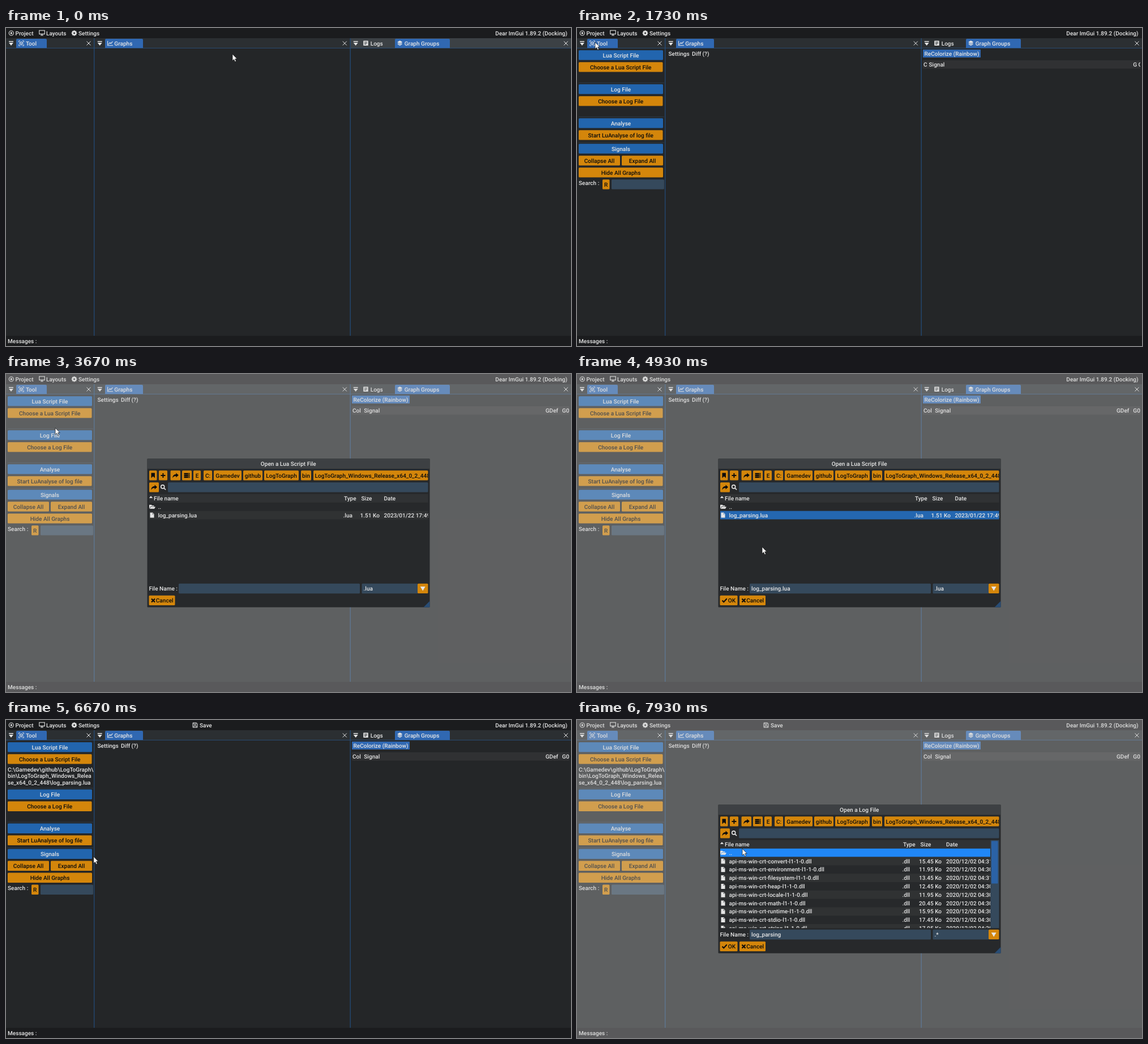
An HTML page that plays this animation: 998x561 px, repeating every 8000 ms.

```html
<!DOCTYPE html>
<html lang="en">
<head>
<meta charset="utf-8">
<title>Log to graph</title>
<style>
html, body { margin: 0; width: 100%; height: 100%; overflow: hidden; background: #242628; }
svg { display: block; width: 998px; height: 561px; }
text { font: 500 10.05px Roboto, "Liberation Sans", sans-serif; text-rendering: geometricPrecision; white-space: pre; }
</style>
</head>
<body>
<svg id="stage" viewBox="0 0 998 561" xmlns="http://www.w3.org/2000/svg"></svg>
<script>
const INK = '#e6e6e6', BLUE = '#2265ae', TAB = '#3068b2', ORANGE = '#d4860b',
      HOT = '#e8980f', DOWN = '#f7a823', FIELD = '#35495c', HOVER = '#2087f7';

const rect = (x, y, w, h, fill, r = 0, more = '') =>
  `<rect x="${x}" y="${y}" width="${w}" height="${h}" fill="${fill}" rx="${r}" ${more}/>`;
const text = (x, y, s, fill = INK, anchor = 'start', more = '') =>
  `<text x="${x}" y="${y + 3.5}" fill="${fill}" text-anchor="${anchor}" ${more}>${s}</text>`;
const button = (x, y, w, s, fill = ORANGE, ink = '#0c0c0c', id = '') =>
  rect(x, y - 8.8, w, 17.4, fill, 1.5, id && `id="${id}"`) + text(x + w / 2, y, s, ink, 'middle');
const label = (y, s) => button(3, y, 149, s, BLUE, INK);
const rule = y => rect(3, y, 151, 0.8, '#31404f');
const solid = (x, y, d, fill = INK) => `<path transform="translate(${x} ${y})" d="${d}" fill="${fill}" fill-rule="evenodd"/>`;
const line = (x, y, d, color = INK, w = 1.1) =>
  `<path transform="translate(${x} ${y})" d="${d}" fill="none" stroke="${color}" stroke-width="${w}"/>`;
const group = (id, body, more = '') => `<g id="${id}" ${more}>${body}</g>`;

const SHARE = 'M-5 4.5C-5-.5-2-2 1-2V-4.5L5.5-.5L1 3.5V1C-2 1-4 2-5 4.5Z';
const FILE = 'M-3.5-4.5H1L3.5-2V4.5H-3.5ZM.6-3.6V-1.6H2.7Z';
const FOLDER = 'M-5-3.5H-1L0-2.2H3.4V-.8H-2.6L-4.6 3H-5ZM-2.2 0H6L4 3.6H-4.2Z';
const CROSS = 'M-3.5-3.5L3.5 3.5M3.5-3.5L-3.5 3.5';

function topBars() {
  const dock = (x, close) =>
    rect(x - 4, 23, 8, 1.5, INK) + solid(x, 28, 'M-4-2H4L0 3Z') + line(close, 27, CROSS, INK, 1);
  const tab = (x, w) => `<path d="M${x} 35.5V21Q${x} 19 ${x + 2} 19H${x + w - 2}Q${x + w} 19 ${x + w} 21V35.5Z" fill="${TAB}"/>`;
  let gear = '';
  for (let i = 0; i < 8; i++) gear += `<rect x="-1.1" y="-4.8" width="2.2" height="3" fill="${INK}" transform="translate(120.5 9) rotate(${i * 45})"/>`;
  return rect(0, 0, 998, 18, '#1b1c1e') + rect(0, 18, 998, 18, '#2b2f32') +
    rect(609, 18, 389, 18, '#3c4145', 0, 'id="focusBar"') +
    rect(1, 1, 51, 16, TAB, 1, 'id="menuHot"') +
    line(9.3, 9, 'M-4 0A4 4 0 1 1 4 0A4 4 0 1 1-4 0') + solid(9.3, 9, 'M-1.7 0A1.7 1.7 0 1 1 1.7 0A1.7 1.7 0 1 1-1.7 0') +
    text(16.5, 9, 'Project') +
    line(63.5, 8, 'M-4.7-3.8H4.7V2.6H-4.7ZM0 3V5M-2.5 5H2.5') + text(71, 9, 'Layouts') +
    gear + line(120.5, 9, 'M-2.5 0A2.5 2.5 0 1 1 2.5 0A2.5 2.5 0 1 1-2.5 0', INK, 2) + text(128, 9, 'Settings') +
    group('save', line(334, 9, 'M-4-4H2.5L4-2.5V4H-4ZM-2-4V-1.2H1.7V-4M-2 4V1H2V4', INK, 1) + text(342, 9, 'Save')) +
    text(991.5, 9, 'Dear ImGui 1.89.2 (Docking)', INK, 'end') +
    tab(18, 54) + tab(175, 67) + tab(687, 97) +
    rect(0, 35.2, 998, 0.8, '#2a5280') +
    dock(9, 146) + dock(165.7, 598.3) + dock(617.7, 989) +
    line(27, 27, 'M-4.3-2V-4.3H-2M2-4.3H4.3V-2M4.3 2V4.3H2M-2 4.3H-4.3V2M0-3L2.7-1.4V1.6L0 3L-2.7 1.6V-1.4ZM-2.7-1.4L0 0L2.7-1.4M0 0V3', INK, 0.9) +
    text(35, 27, 'Tool') +
    line(184, 27, 'M-4.4-4.2V3.8H5M-3 2L-.5-1.2L1.2.4L4.4-3.2') + text(191.3, 27, 'Graphs') +
    solid(635.5, 26.7, 'M-4.2-4.2H4.2V4.2H-4.2ZM-2.5-2.4V-1.4H2.5V-2.4ZM-2.5-.5V.5H2.5V-.5ZM-2.5 1.4V2.4H1V1.4Z') + text(643.7, 27, 'Logs') +
    solid(695.7, 26.7, 'M0-4.5L4.5-2.3L0 0L-4.5-2.3ZM-4.5-.5L-3-.9L0 .9L3-.9L4.5-.5L0 2.2ZM-4.5 1.8L-3 1.2L0 3L3 1.2L4.5 1.8L0 4.5Z') +
    text(703.7, 27, 'Graph Groups') +
    rect(155.2, 18, 1.1, 525, '#245285') + rect(607.6, 18, 1.1, 525, '#245285') +
    rect(0, 543, 998, 18, '#1b1c1e') + text(3, 552, 'Messages :');
}

function panes() {
  const paths = ['C:\\Gamedev\\github\\LogToGraph\\', 'bin\\LogToGraph_Windows_Relea', 'se_x64_0_2_448\\log_parsing.lua'];
  const header = cols => cols.map(([x, s]) => text(x, 64.3, s)).join('');
  return label(48, 'Lua Script File') + button(3, 69, 148.5, 'Choose a Lua Script File', ORANGE, '#0c0c0c', 'luaBtn') +
    group('path', paths.map((s, i) => text(3, 87 + i * 11.8, s)).join('')) +
    group('lower',
      rule(96.4) + label(108, 'Log File') + button(3, 129, 148.5, 'Choose a Log File', ORANGE, '#0c0c0c', 'logBtn') +
      rule(156.4) + label(168, 'Analyse') + button(3, 189, 148.5, 'Start LuAnalyse of log file') +
      rule(201.6) + label(213, 'Signals') + button(3, 234, 73, 'Collapse All') + button(79, 234, 73, 'Expand All') +
      button(3, 255, 149, 'Hide All Graphs') + text(3, 273, 'Search :') +
      button(45, 276, 12.5, 'R') + rect(61, 267.2, 93, 17.4, FIELD, 1.5)) +
    text(161.5, 45, 'Settings') + text(203, 45, 'Diff') + text(221.5, 45, '(?)') +
    rect(611, 38, 102, 14, TAB) + text(613.5, 45, 'ReColorize (Rainbow)') +
    rect(611, 57, 384, 14.6, '#303133') +
    group('narrow', header([[612, 'C'], [621.5, 'Signal'], [982.3, 'G'], [991.5, 'G']]), 'clip-path="url(#rightClip)"') +
    group('wide', header([[612, 'Col'], [632.3, 'Signal'], [953, 'GDef'], [982.3, 'G0']]));
}

const rowY = i => 234.2 + i * 14.8;
const dlls = [['convert', '15.45', 31], ['environment', '11.95', 30], ['filesystem', '13.45', 31], ['heap', '12.45', 30],
  ['locale', '11.95', 30], ['math', '20.45', 30], ['runtime', '15.95', 30], ['stdio', '17.45', 30], ['string', '17.95', 30]];

function fileRow(i, cells, xs) {
  return solid(258, rowY(i), FILE) + cells.map((s, k) => text(xs[k], rowY(i), s)).join('');
}
const heads = xs => ['Type', 'Size', 'Date'].map((s, k) => text(xs[k], 219.5, s)).join('');

function dialog() {
  const crumbs = [[331, 13, 'E'], [349, 15, 'C:'], [367, 49, 'Gamedev'], [419, 34, 'github'], [456, 61, 'LogToGraph'], [521, 18, 'bin']];
  const dark = '#0c0c0c', cancel = x => button(x, 399.5, 46, '') + line(x + 7.5, 399.5, 'M-3-3L3 3M3-3L-3 3', dark, 2.2) + text(x + 12.3, 399.5, 'Cancel', dark);
  let stripes = '';
  for (let i = 1; i < 10; i += 2) stripes += rect(253, rowY(i) - 7.4, 478, 14.8, '#303233');
  const lua = [595.5, 625.5, 667.5], log = [574.5, 604, 652];
  return rect(249.5, 149.5, 499, 262, '#27292b', 1) + rect(249.5, 149.5, 499, 17.8, '#3d4043', 1) +
    button(253, 179, 13.5, '') + solid(259.7, 179, 'M-3.2-4.5H3.2V4.5L0 1.6L-3.2 4.5Z', dark) +
    button(270, 179, 15, '') + line(277.4, 179, 'M-4 0H4M0-4V4', dark, 2) +
    button(290.5, 179, 17.5, '') + solid(299.3, 179, SHARE, dark) +
    button(311, 179, 17, '') + solid(319.5, 179, 'M-5-4.2H5V-1.8H-5ZM-5-1.2H5V1.2H-5ZM-5 1.8H5V4.2H-5ZM2-3.4V-2.6H4V-3.4ZM2-.4V.4H4V-.4ZM2 2.6V3.4H4V2.6Z', dark) +
    crumbs.map(([x, w, s]) => button(x, 179, w, s)).join('') +
    rect(543, 170.2, 202.5, 17.4, ORANGE, 1.5) +
    text(545.5, 179, 'LogToGraph_Windows_Release_x64_0_2_448', dark, 'start', 'clip-path="url(#crumbClip)"') +
    button(253, 200, 17, '') + solid(261.5, 200, SHARE, dark) +
    line(277.5, 199.5, 'M-3.8-.6A3 3 0 1 1 2.2-.6A3 3 0 1 1-3.8-.6M1.4 1.6L4.6 4.8', INK, 1.6) +
    rect(286, 191.2, 459.5, 17.4, FIELD, 1.5) +
    rect(253, 212, 492.5, 14.8, '#303234') + solid(256, 217, 'M-3.2 1.8L0-1.8L3.2 1.8Z') + text(261, 219.5, 'File name') +
    group('luaList', text(498.8, 158, 'Open a Lua Script File', INK, 'middle') + heads([597, 627.5, 667.5]) +
      rect(253, rowY(1) - 7.4, 492.5, 14.8, '#303233', 0, 'id="fileRow"') +
      `<g clip-path="url(#crumbClip)">${fileRow(1, ['log_parsing.lua', '.lua', '1.51 Ko', '2023/01/22 17:49'], [268.5, ...lua])}</g>` +
      text(631.5, 378.5, '')) +
    group('logList', text(498.8, 158, 'Open a Log File', INK, 'middle') +
      heads([576, 606.5, 652]) + rect(253, rowY(0) - 7.4, 477, 14.8, HOVER, 0, 'id="upRow"') +
      `<g clip-path="url(#listClip)">${stripes}${dlls.map(([n, size, min], i) =>
        fileRow(i + 1, [`api-ms-win-crt-${n}-l1-1-0.dll`, '.dll', size + ' Ko', '2020/12/02 04:' + min], [268.5, ...log])).join('')}</g>` +
      rect(730.5, 212, 15, 155, FIELD) + rect(732, 213.5, 11.5, 75, '#2b62a6', 1)) +
    solid(258, rowY(0), FOLDER) + text(268.5, 234.2, '..') +
    text(252.5, 378.5, 'File Name :') + rect(305, 369.8, 320, 17.4, FIELD, 1.5) + text(308, 378.5, '', INK, 'start', 'id="name"') +
    rect(628.5, 369.8, 99, 17.4, FIELD, 1.5) + text(631.5, 378.5, '', INK, 'start', 'id="filter"') +
    button(727, 378.5, 18.5, '') + solid(736.2, 378.5, 'M-4.4-3.5H4.4L0 4Z', INK) +
    group('cancelOnly', cancel(252.5)) +
    group('okCancel', button(252.5, 399.5, 31, '', ORANGE, dark, 'okBtn') + line(260.5, 399.5, 'M-4 0L-1.3 2.8L4.2-3.2', dark, 2) +
      text(266.8, 399.5, 'OK', dark) + cancel(287)) +
    group('grip', solid(748.5, 411.5, 'M0 0V-11L-11 0Z', '#294d75'));
}

const clip = (id, x, y, w, h) => `<clipPath id="${id}">${rect(x, y, w, h, '#000')}</clipPath>`;
const menu = rect(1, 18, 61, 51, '#1f2122', 0, 'stroke="#3a3e42" stroke-width=".8"') +
  rect(3, 22, 57, 16, HOVER, 0, 'id="newHot"') + text(8, 30, 'New') + rect(3, 43, 57, 0.8, '#3a4a5a') + text(8, 56, 'Open');

document.getElementById('stage').innerHTML =
  '<defs>' + clip('rightClip', 609, 50, 386, 30) + clip('crumbClip', 250, 168, 495.5, 100) + clip('listClip', 253, 226, 477, 141) + '</defs>' +
  rect(0, 0, 998, 561, '#242628') + topBars() + group('panes', panes()) + group('menu', menu) +
  rect(0, 0, 998, 561, 'rgba(204,204,204,.35)', 0, 'id="dim"') + group('dialog', dialog()) +
  group('cursor', '<path d="M0 0V11.8L2.7 9.4L4.5 13.5L6.5 12.6L4.7 8.6H8.2Z" fill="#fff" stroke="#111" stroke-width=".7"/>');

const el = {};
document.querySelectorAll('#stage [id]').forEach(n => el[n.id] = n);

// pointer path: tick, x, y
const TICK = 8000 / 120;
const path = [[0, 400, 46], [2, 320, 60], [4, 205, 65], [6, 80, 36], [8, 20, 9], [14, 20, 9], [18, 32, 25], [34, 32, 25],
  [37, 60, 65], [39, 60, 65], [41, 57, 70], [54, 57, 70], [55, 87, 95], [59, 210, 172], [64, 320, 247], [73, 320, 247],
  [74, 327, 305], [77, 312, 385], [79, 288, 422], [83, 267, 403], [92, 267, 403], [97, 222, 325], [102, 110, 185],
  [105, 87, 152], [114, 87, 152], [119, 292, 227], [120, 292, 227]];

function pointer(k) {
  const i = path.findIndex((p, n) => n && p[0] >= k);
  const [a, x, y] = path[i - 1], [b, u, v] = path[i], f = (k - a) / (b - a);
  return [x + (u - x) * f, y + (v - y) * f];
}
const show = (id, on) => { el[id].style.display = on ? '' : 'none'; };
const paint = (id, color) => el[id].setAttribute('fill', color);

function draw(ms) {
  const k = Math.floor(ms / TICK + 0.06) % 120;
  const within = (a, b) => k >= a && k < b;
  const [x, y] = pointer(k);
  const luaOpen = within(47, 88), logOpen = k >= 110, dim = within(55, 88) || k >= 115;
  const picked = k >= 70, overRow = i => x > 253 && x < 745 && Math.abs(y - rowY(i)) < 7.4;

  el.cursor.setAttribute('transform', `translate(${x.toFixed(1)} ${y.toFixed(1)})`);
  show('focusBar', k < 11);
  show('menuHot', within(8, 26));
  show('menu', within(11, 26));
  show('newHot', within(17, 26));
  show('panes', k >= 26);
  show('narrow', k < 35);
  show('wide', k >= 35);
  show('save', k >= 88);
  show('path', k >= 88);
  el.lower.setAttribute('transform', `translate(0 ${k >= 88 ? 23.4 : 0})`);
  paint('luaBtn', within(45, 47) ? DOWN : within(37, 45) ? HOT : ORANGE);
  paint('logBtn', within(107, 110) ? DOWN : within(104, 107) ? HOT : ORANGE);

  show('dim', dim);
  show('grip', dim);
  show('dialog', luaOpen || logOpen);
  show('luaList', luaOpen);
  show('logList', logOpen);
  show('upRow', dim && overRow(0));
  paint('fileRow', dim && overRow(1) ? (k === 69 ? '#1479e6' : HOVER) : picked ? '#2467b1' : '#303233');
  show('cancelOnly', !picked);
  show('okCancel', picked);
  paint('okBtn', k === 87 ? DOWN : within(82, 87) ? HOT : ORANGE);
  el.name.textContent = logOpen ? 'log_parsing' : picked ? 'log_parsing.lua' : '';
  el.filter.textContent = logOpen ? '.*' : '.lua';
}

const start = performance.now();
function loop() {
  draw((performance.now() - start) % 8000);
  requestAnimationFrame(loop);
}
loop();
</script>
</body>
</html>
```
